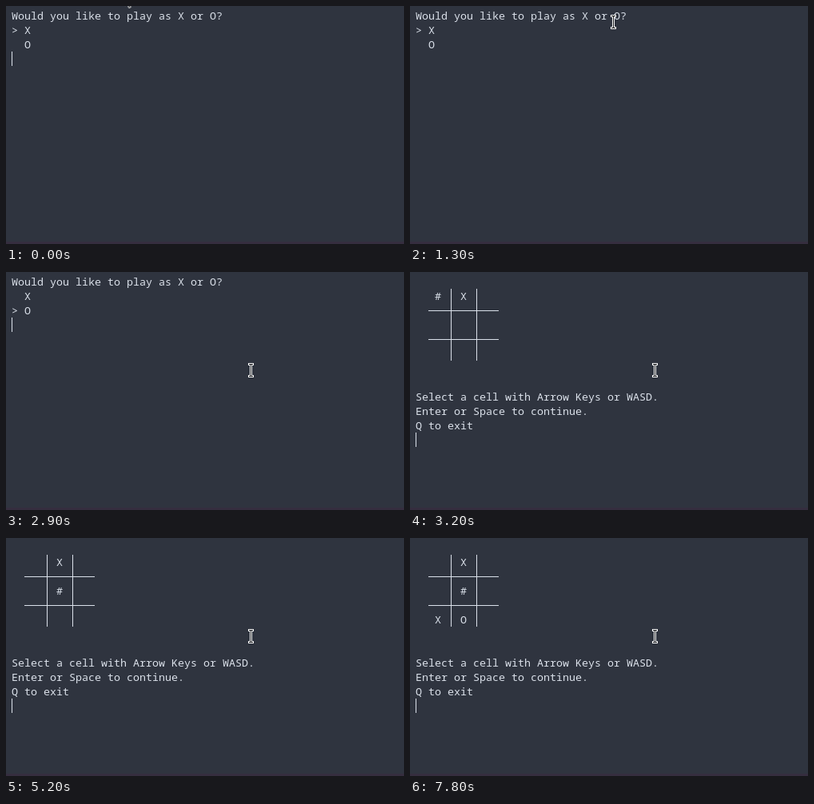
These frames come from a looping animation (498 by 298 pixels, 8000 ms). An HTML page:

```html
<!DOCTYPE html>
<html lang="en">
<head>
<meta charset="utf-8">
<title>Noughts and crosses in a terminal</title>
<style>
  html, body { margin: 0; width: 100%; height: 100%; overflow: hidden; background: #2f343f; }
  svg { display: block; width: 498px; height: 298px; }
  text { font: 500 13.3333px "Noto Sans Mono", "DejaVu Sans Mono", monospace; fill: #dbe1ea; }
  .line { fill: #dbe1ea; }
  .anim { animation: 8s step-end infinite; }

  /* percent = ms / 80 */
  #menu { animation-name: menu; }
  @keyframes menu { 0% { opacity: 1 } 40% { opacity: 0 } }

  #game { animation-name: game; }
  @keyframes game { 0% { opacity: 0 } 40% { opacity: 1 } }

  #choice { animation-name: choice; }
  @keyframes choice { 0% { transform: none } 35% { transform: translateY(18px) } }

  #caret { animation-name: caret-row, blink; }
  @keyframes caret-row { 0% { transform: none } 40% { transform: translateY(144px) } }
  @keyframes blink {
    0%, 17.5%, 36.25%, 55%, 97.5% { opacity: 1 }
    11.25%, 33.75%, 47.5%, 90% { opacity: 0 }
  }

  #pick { animation-name: pick; }
  @keyframes pick {
    0% { transform: none; opacity: 1 }
    56.25% { transform: translate(0, 36px) }
    58.75% { transform: translate(0, 72px) }
    62.5% { transform: translate(32px, 72px) }
    65% { transform: translate(32px, 36px) }
    72.5% { transform: translate(32px, 72px) }
    75% { opacity: 0 }
    82.5% { transform: translate(32px, 36px); opacity: 1 }
  }

  #reply { animation-name: reply; }
  @keyframes reply { 0% { opacity: 0 } 75% { opacity: 1 } }
  #small { animation-name: small; }
  @keyframes small { 0%, 82.5% { opacity: 0 } 75% { opacity: 1 } }
  #move { animation-name: move; }
  @keyframes move { 0% { opacity: 0 } 82.5% { opacity: 1 } }

  #arrow { animation-name: arrow; }
  @keyframes arrow {
    0% { transform: translate(148.5px, -14px); opacity: 1 }
    2.5%, 26.25% { opacity: 0 }
    25% { transform: translate(259.5px, -4px); opacity: 1 }
  }

  #beam { animation-name: beam; }
  @keyframes beam {
    0% { transform: translate(160px, 30px); opacity: 0 }
    2.5% { transform: translate(160px, 30px); opacity: 1 }
    3.75% { transform: translate(178px, 72px) }
    5% { transform: translate(187px, 98px) }
    6.25% { transform: translate(190px, 108px) }
    13.75% { transform: translate(200px, 92px) }
    15% { transform: translate(225px, 58px) }
    16.25% { transform: translate(254px, 20px) }
    17.5% { opacity: 0 }
    26.25% { transform: translate(306px, 123px); opacity: 1 }
  }
</style>
</head>
<body>
<svg viewBox="0 0 498 298">
  <rect width="498" height="298" fill="#2f343f"/>
  <rect y="295" width="498" height="3" fill="#352e3f"/>

  <g id="menu" class="anim">
    <text x="7" y="17">Would you like to play as X or O?</text>
    <text x="23" y="35">X</text>
    <text x="23" y="53">O</text>
    <text id="choice" class="anim" x="7" y="35">&gt;</text>
  </g>

  <g id="game" class="anim">
    <path class="line" d="M51 21h1v90h-1zM83 21h1v90h-1zM23 48h88v1h-88zM23 84h88v1h-88z"/>
    <text x="63" y="35">X</text>
    <text id="pick" class="anim" x="31" y="35">#</text>
    <text id="reply" class="anim" x="31" y="107">X</text>
    <text id="small" class="anim" x="63" y="107">o</text>
    <text id="move" class="anim" x="63" y="107">O</text>
    <text x="7" y="161">Select a cell with Arrow Keys or WASD.</text>
    <text x="7" y="179">Enter or Space to continue.</text>
    <text x="7" y="197">Q to exit</text>
  </g>

  <rect id="caret" class="anim line" x="7" y="57" width="1" height="18"/>

  <path id="arrow" class="anim" d="M0 0V14L3.2 11.2L5.4 16.5L7.6 15.6L5.4 10.3H9.5Z"
        fill="#14161a" stroke="#fff"/>
  <g id="beam" class="anim">
    <path d="M-3-9h7v3h-2v12h2v3h-7v-3h2v-12h-2z" fill="#fff"/>
    <path d="M-2-8h5v1h-2v14h2v1h-5v-1h2v-14h-2z" fill="#14161a"/>
  </g>
</svg>
</body>
</html>
```
